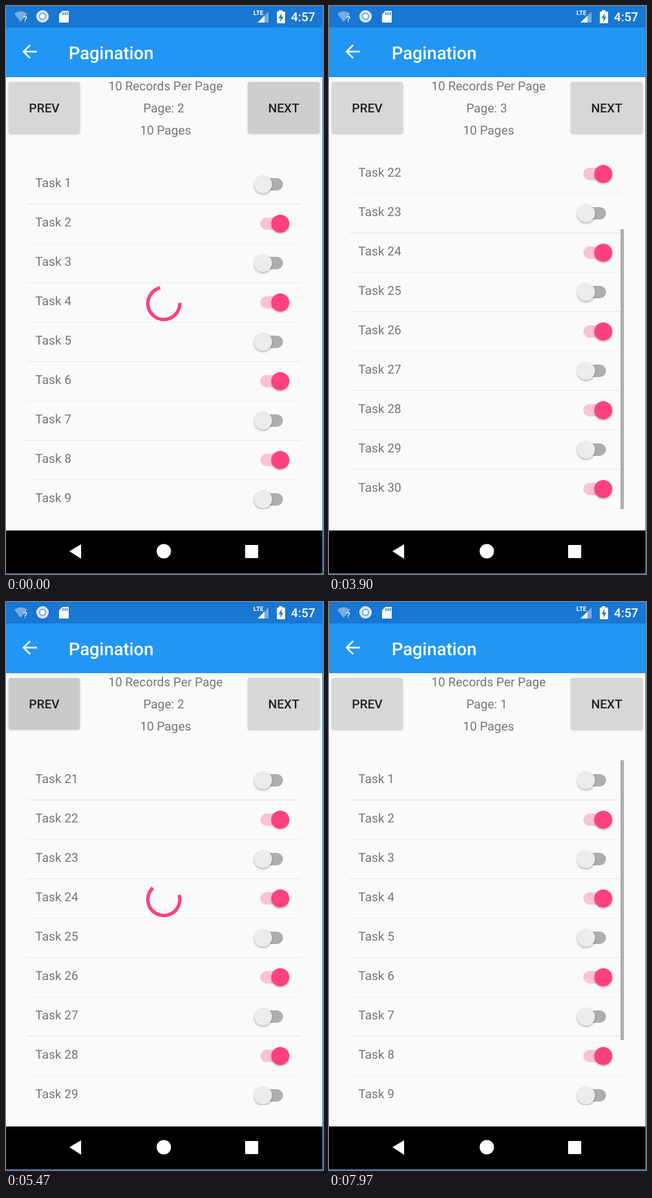
Animation, 460 px wide and 822 px high, one loop 8 s. Source, as an HTML page with a canvas:

```html
<!DOCTYPE html>
<html lang="en">
<head>
<meta charset="utf-8">
<title>Pagination</title>
<style>
html, body { margin: 0; width: 100%; height: 100%; overflow: hidden; background: #000; }
canvas { display: block; width: 460px; height: 822px; }
</style>
</head>
<body>
<canvas id="stage" width="460" height="822"></canvas>
<script>
const ctx = document.getElementById('stage').getContext('2d');
const LOOP = 8000;
const WAIT = 1250;
const LIST = { x: 30, y: 229, w: 398, h: 499, row: 57, maxScroll: 72 };
const C = {
  status: '#1976d2', bar: '#2196f3', page: '#fafafa', button: '#d6d7d7',
  text: '#757575', dark: '#212121', white: '#ffffff', accent: '#ff4081',
  accentTrack: '#fbc2d6', track: '#aeaeae', thumb: '#ececec',
  dim: '#75ade4', edge: '#3f7fc0'
};

// Each request starts at a time and brings a page after WAIT
const loads = [
  { start: -500, page: 2, side: 'next' },
  { start: 2130, page: 3, side: 'next' },
  { start: 5050, page: 2, side: 'prev' },
  { start: 6660, page: 1, side: 'prev' }
];
// Times at which the scrollbar appears and begins to fade
const barTimes = [[750, 1800], [3380, 4850], [6300, 7510], [7910, 9000]];

const clamp = v => Math.max(0, Math.min(1, v));
const span = (t, a, b) => clamp((t - a) / (b - a));
const smooth = v => v * v * (3 - 2 * v);
const mix = (a, b, k) => a + (b - a) * k;
const lastOf = (list, test) => list.filter(test).pop();

// Bezier (0,0) (.2,0) (.1,1) (.5,1), solved for x
function trim(x) {
  if (x <= 0) return 0;
  if (x >= 0.5) return 1;
  let lo = 0, hi = 1;
  for (let i = 0; i < 24; i++) {
    const u = (lo + hi) / 2, v = 1 - u;
    if (0.6 * v * v * u + 0.3 * v * u * u + 0.5 * u * u * u < x) lo = u; else hi = u;
  }
  return smooth(lo);
}

function rect(x, y, w, h, color) {
  ctx.fillStyle = color;
  ctx.fillRect(x, y, w, h);
}

function pill(x, y, w, h, r, color) {
  ctx.fillStyle = color;
  ctx.beginPath();
  ctx.roundRect(x, y, w, h, r);
  ctx.fill();
}

function disc(x, y, r, color) {
  ctx.fillStyle = color;
  ctx.beginPath();
  ctx.arc(x, y, r, 0, Math.PI * 2);
  ctx.fill();
}

function poly(points, color) {
  ctx.fillStyle = color;
  ctx.beginPath();
  points.forEach(([x, y]) => ctx.lineTo(x, y));
  ctx.fill();
}

function text(str, x, y, size, color, weight = 400, align = 'left') {
  ctx.font = `${weight} ${size}px Roboto, "Open Sans", sans-serif`;
  ctx.textRendering = 'geometricPrecision';
  ctx.textAlign = align;
  ctx.fillStyle = color;
  ctx.fillText(str, x, y);
}

function shadow(dy, blur, alpha) {
  ctx.shadowColor = `rgba(0,0,0,${alpha})`;
  ctx.shadowOffsetY = dy;
  ctx.shadowBlur = blur;
}

function statusBar() {
  rect(0, 0, 460, 31, C.status);
  ctx.fillStyle = C.dim;
  ctx.beginPath();
  ctx.moveTo(21, 23);
  ctx.lineTo(12, 11);
  ctx.quadraticCurveTo(21, 4, 31, 11);
  ctx.fill();
  text('?', 25, 23, 12, C.white, 500);

  disc(53, 15, 9, '#dcebf9');
  disc(53, 15, 5.5, C.dim);
  disc(53, 15, 3.5, C.white);

  poly([[77, 12], [82, 7], [91, 7], [91, 24], [77, 24]], C.white);
  for (let i = 0; i < 3; i++) rect(82 + i * 3, 9, 1.5, 4, C.status);

  poly([[365, 24], [381, 8], [381, 24]], C.dim);
  poly([[365, 24], [375, 14], [375, 24]], C.white);
  text('LTE', 359, 13, 9, C.white, 700);

  rect(396, 6, 5, 3, C.white);
  pill(393, 8, 12, 17, 1, C.white);
  poly([[400, 10], [395.5, 17.5], [398.5, 17.5], [398, 23], [402.5, 15.5], [399.5, 15.5]], C.status);
  text('4:57', 413.5, 22, 17.9, C.white, 500);
}

function toolbar() {
  rect(0, 31, 460, 72, C.bar);
  ctx.strokeStyle = C.white;
  ctx.lineWidth = 2.4;
  ctx.beginPath();
  ctx.moveTo(45, 66);
  ctx.lineTo(26, 66);
  ctx.moveTo(35, 56.5);
  ctx.lineTo(25.5, 66);
  ctx.lineTo(35, 75.5);
  ctx.stroke();
  text('Pagination', 91, 77, 25.6, C.white, 500);
}

function button(label, x, w, side, t) {
  ctx.save();
  shadow(1, 3, 0.25);
  pill(x, 110, w, 74, 3, C.button);
  ctx.restore();
  const load = loads.find(l => l.side === side && t > l.start - 120 && t < l.start + 700);
  if (load) {
    const age = t - load.start;
    ctx.save();
    ctx.beginPath();
    ctx.roundRect(x, 110, w, 74, 3);
    ctx.clip();
    ctx.globalAlpha = 0.12 * (1 - span(age, 200, 700));
    disc(x + w / 2, 147, mix(12, 70, smooth(span(age, -120, 200))), '#000');
    ctx.restore();
  }
  text(label, x + w / 2, 154, 17.9, C.dark, 500, 'center');
}

function header(t) {
  const page = lastOf(loads, l => l.start <= t).page;
  text('10 Records Per Page', 231.5, 122, 17.9, C.text, 400, 'center');
  text('Page: ' + page, 228.8, 154, 17.9, C.text, 400, 'center');
  text('10 Pages', 231.5, 186, 17.9, C.text, 400, 'center');
  button('PREV', 4, 103, 'prev', t);
  button('NEXT', 351, 104, 'next', t);
}

function toggle(y, on) {
  pill(on ? 369 : 373, y - 9, 29, 18, 9, on ? C.accentTrack : C.track);
  ctx.save();
  shadow(1.5, 3, 0.3);
  disc(on ? 398 : 373, y, 13, on ? C.accent : C.thumb);
  ctx.restore();
}

function scrollAt(t) {
  const k = t < loads[1].start + WAIT
    ? smooth(span(t, 1330, 1500))
    : smooth(span(t, 3730, 3890)) - smooth(span(t, 4370, 4530));
  return k * LIST.maxScroll;
}

function rows(t) {
  const done = lastOf(loads, l => l.start + WAIT <= t);
  const first = done ? (done.page - 1) * 10 : 0;
  const scroll = scrollAt(t);
  for (let i = 0; i < 10; i++) {
    const top = Math.round(LIST.y + i * LIST.row - scroll);
    const line = top + LIST.row;
    rect(LIST.x, line, LIST.w, 1, line % 2 ? '#f0f0f1' : '#e6e6e8');
    text('Task ' + (first + i + 1), 42.5, top + 32.5, 17.9, C.text);
    toggle(top + 29, i % 2 === 1);
  }
}

function scrollbar(t) {
  const on = lastOf(barTimes, b => t >= b[0]);
  if (!on) return;
  const s = scrollAt(t), a = span(s, 0, 26), b = span(s, 26, LIST.maxScroll);
  const top = mix(mix(0, 61, a), 94, b);
  const height = mix(mix(405, 363, a), 405, b);
  ctx.globalAlpha = 1 - span(t, on[1], on[1] + 250);
  rect(423, LIST.y + top, 5, height, C.track);
  ctx.globalAlpha = 1;
}

function glow(t) {
  const k = smooth(span(t, 4500, 4600)) * (1 - smooth(span(t, 4640, 5100)));
  if (!k) return;
  const h = 33 * k, right = LIST.x + LIST.w;
  ctx.globalAlpha = 0.13 * k;
  ctx.fillStyle = C.bar;
  ctx.beginPath();
  ctx.moveTo(LIST.x, LIST.y);
  ctx.lineTo(LIST.x, LIST.y + h * 0.5);
  ctx.quadraticCurveTo(240, LIST.y + h * 1.45, right, LIST.y + h * 0.6);
  ctx.lineTo(right, LIST.y);
  ctx.fill();
  ctx.globalAlpha = 1;
}

function spinner(t) {
  const load = loads.find(l => t >= l.start && t < l.start + WAIT);
  if (!load) return;
  const age = t - load.start, p = age / 1333 % 1;
  const base = p * 0.25 + age / 6665 * 2 - 0.25;
  const from = base + 0.75 * trim(p - 0.5);
  const to = base + 0.75 * trim(p);
  ctx.strokeStyle = C.accent;
  ctx.lineWidth = 5;
  ctx.beginPath();
  ctx.arc(229, 430.5, 23.2, from * Math.PI * 2, Math.max(to, from + 0.01) * Math.PI * 2);
  ctx.stroke();
}

function navBar() {
  rect(0, 759, 460, 63, '#000');
  poly([[92, 789], [109, 779], [109, 800]], C.white);
  disc(229, 789, 10.5, C.white);
  pill(347, 780, 19, 19, 1, C.white);
}

function draw(t) {
  rect(0, 0, 460, 822, C.page);
  statusBar();
  toolbar();
  header(t);
  ctx.save();
  ctx.beginPath();
  ctx.rect(LIST.x, LIST.y, LIST.w, LIST.h);
  ctx.clip();
  rows(t);
  glow(t);
  scrollbar(t);
  ctx.restore();
  spinner(t);
  navBar();
  rect(459, 0, 1, 822, C.edge);
  rect(0, 821, 460, 1, C.edge);
}

const began = performance.now();
function tick() {
  draw((performance.now() - began) % LOOP);
  requestAnimationFrame(tick);
}
tick();
</script>
</body>
</html>
```
